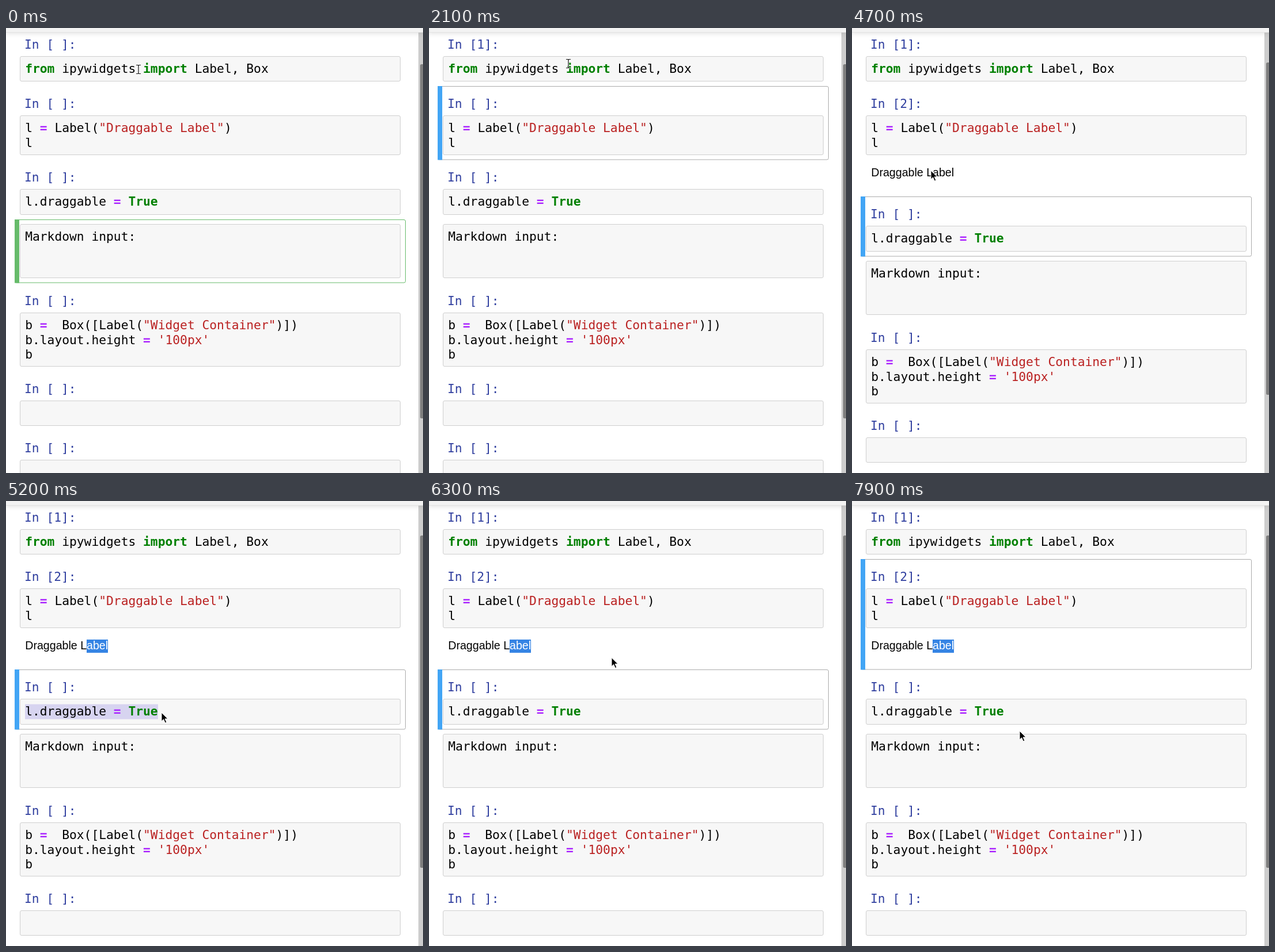
An HTML page that plays this animation: 724x774 px, repeating every 8000 ms.

```html
<!DOCTYPE html>
<html lang="en">
<head>
<meta charset="utf-8">
<title>Draggable label notebook</title>
<style>
html, body { margin: 0; width: 100%; height: 100%; overflow: hidden; background: #fff; }
#stage { position: relative; width: 724px; height: 774px; overflow: hidden; }
svg { position: absolute; left: 0; top: 0; }
#header {
  position: absolute; left: 0; top: 0; width: 724px; height: 7px;
  background: #f3f3f3; border-bottom: 1px solid #e4e4e4;
  box-shadow: 0 0 9px 1px rgba(87, 87, 87, .2);
}
text { white-space: pre; }
.code, .prompt { font: 21.27px "DejaVu Sans Mono", monospace; }
.prompt { fill: #303f9f; }
.label { font: 19.6px "Liberation Sans", Arial, sans-serif; }
.kw { fill: #008000; font-weight: bold; }
.op { fill: #a2f; font-weight: bold; }
.str { fill: #ba2121; }
.box { fill: #f7f7f7; stroke: #cfcfcf; }
</style>
</head>
<body>
<div id="stage">
  <svg id="page" width="724" height="774"></svg>
  <div id="header"></div>
  <svg id="pointer" width="724" height="774">
    <g id="arrow">
      <path d="M0 0V15.2L3.6 11.8L6.3 18L8.8 16.9L6.1 10.9H11Z" fill="#000" stroke="#fff" stroke-width="1"/>
    </g>
    <g id="beam" fill="none">
      <path id="stem" d="M-4 -7.5H-1L0 -6.5L1 -7.5H4M0 -6.5V6.5M-4 7.5H-1L0 6.5L1 7.5H4" stroke="#fff" stroke-width="2.4"/>
      <path d="M-4 -7.5H-1L0 -6.5L1 -7.5H4M0 -6.5V6.5M-4 7.5H-1L0 6.5L1 7.5H4" stroke="#111" stroke-width="1.2"/>
    </g>
  </svg>
</div>
<script>
const LOOP = 8000, STEP = 100, LINE = 25.4, CODE_X = 33.2, SHIFT = 64;
const page = document.getElementById('page');
const arrow = document.getElementById('arrow');
const beam = document.getElementById('beam');

function add(parent, tag, attrs, html) {
  const el = document.createElementNS('http://www.w3.org/2000/svg', tag);
  for (const k in attrs) el.setAttribute(k, attrs[k]);
  if (html) el.innerHTML = html;
  parent.appendChild(el);
  return el;
}
const show = (el, on) => el.setAttribute('visibility', on ? 'visible' : 'hidden');
const span = (cls, s) => `<tspan class="${cls}">${s}</tspan>`;
const kw = s => span('kw', s), op = s => span('op', s), str = s => span('str', s);

// Each cell: top of its box, box height, lines of code, prompt or not
const cells = [
  { y: 49.5, h: 43, code: [kw('from') + ' ipywidgets ' + kw('import') + ' Label, Box'] },
  { y: 152.5, h: 68, code: ['l ' + op('=') + ' Label(' + str('"Draggable Label"') + ')', 'l'] },
  { y: 280.5, h: 44, code: ['l.draggable ' + op('=') + ' ' + kw('True')] },
  { y: 341.5, h: 93, code: ['Markdown input:'], markdown: true },
  { y: 495.5, h: 93, code: ['b ' + op('=') + '  Box([Label(' + str('"Widget Container"') + ')])',
    'b.layout.height ' + op('=') + ' ' + str("'100px'"), 'b'] },
  { y: 648.5, h: 43, code: [] },
  { y: 751.5, h: 43, code: [] }
];

const upper = add(page, 'g'), lower = add(page, 'g');
let codeMark;
cells.forEach((c, i) => {
  const g = add(i < 2 ? upper : lower, 'g');
  add(g, 'rect', { class: 'box', x: 24.5, y: c.y, width: 660, height: c.h, rx: 2.5 });
  if (i === 2) {
    codeMark = add(g, 'rect', { x: 33, y: c.y + 9, width: 231, height: 26, fill: '#d7d4f0' });
  }
  c.code.forEach((line, n) =>
    add(g, 'text', { class: 'code', x: CODE_X, y: c.y + 28.8 + n * LINE }, line));
  if (!c.markdown) {
    c.prompt = add(g, 'text', { class: 'prompt', x: 32, y: c.y - 13.7 }, 'In [ ]:');
  }
});

// Widget output below the second cell
const output = add(page, 'g');
const mark = add(output, 'rect', { x: 140, y: 241, width: 37, height: 23, fill: '#3584e4' });
const label = add(output, 'text', { class: 'label', x: 33.3, y: 258 }, 'Draggable L<tspan>abel</tspan>');
const labelEnd = label.querySelector('tspan');

// Selected cell outline, text caret, scrollbar
const frame = add(page, 'rect', { x: 15.5, width: 678, rx: 2.5, fill: 'none' });
const bar = add(page, 'rect', { x: 15, width: 8 });
const caret = add(page, 'rect', { width: 1.6, height: 25.6, fill: '#000' });
add(page, 'rect', { x: 716, y: 8, width: 8, height: 766, fill: '#cdcdcd' });
const thumb = add(page, 'rect', { x: 719, width: 7, rx: 2.5, fill: '#7f7f7f' });

// Pointer path: time, x, y
const path = [
  [0, 230, 72], [300, 242, 62], [3900, 242, 62], [4000, 232, 86], [4200, 176, 190],
  [4300, 148, 240], [4400, 137, 259], [4600, 137, 259], [4700, 137, 248], [4800, 140, 251],
  [5000, 215, 316], [5200, 270, 368], [5500, 226, 315.5], [5600, 229, 319], [5700, 236, 320],
  [6300, 317, 272.5], [6700, 317, 272.5], [6800, 300, 272], [7300, 135, 244],
  [7500, 135, 244], [7900, 291, 400]
];

function pointerAt(t) {
  const i = path.findIndex(p => p[0] >= t);
  if (i <= 0) return path[0].slice(1);
  const [t0, x0, y0] = path[i - 1], [t1, x1, y1] = path[i];
  const k = (t - t0) / (t1 - t0);
  return [x0 + (x1 - x0) * k, y0 + (y1 - y0) * k];
}

// Selected cell over time: start, cell index, edit mode
const focus = [[0, 3, true], [900, 0, true], [2000, 1, false], [3300, 2, false], [7400, 1, false]];

function select(t, ran) {
  const [, index, edit] = focus.filter(f => f[0] <= t).pop();
  const c = cells[index], dy = ran && index > 1 ? SHIFT : 0;
  const top = c.y + dy - (c.markdown ? 8 : 51);
  const bottom = c.y + dy + c.h + 8.5 + (ran && index === 1 ? SHIFT : 0);
  frame.setAttribute('y', top);
  frame.setAttribute('height', bottom - top);
  frame.setAttribute('stroke', edit ? '#66bb6a' : '#ababab');
  bar.setAttribute('y', top - .5);
  bar.setAttribute('height', bottom - top + 1);
  bar.setAttribute('fill', edit ? '#66bb6a' : '#42a5f5');
}

function draw(t) {
  const ran = t >= 3300;
  lower.setAttribute('transform', `translate(0 ${ran ? SHIFT : 0})`);
  show(output, ran);
  select(t, ran);
  cells[0].prompt.textContent = `In [${t < 2000 ? ' ' : t < 2100 ? '*' : '1'}]:`;
  cells[1].prompt.textContent = `In [${ran ? '2' : ' '}]:`;
  thumb.setAttribute('y', ran ? 60 : 63);
  thumb.setAttribute('height', ran ? 578 : 616);

  const inFirst = t >= 900;
  caret.setAttribute('x', inFirst ? 238 : 33.2);
  caret.setAttribute('y', inFirst ? 58.2 : 400.8);
  show(caret, (t >= 100 && t < 600) || (t >= 900 && t < 1500));

  const [x, y] = pointerAt(t);
  const text = t < 4100 || t === 4200;
  const tool = text ? beam : arrow;
  tool.setAttribute('transform', `translate(${x} ${y})`);
  show(beam, text);
  show(arrow, !text);

  const marked = t >= 4800;
  mark.setAttribute('opacity', marked ? 1 : 0);
  labelEnd.setAttribute('fill', marked ? '#fff' : '#000');
  show(codeMark, t > 4700 && t < 5500 && y >= 345);
}

const start = performance.now();
function tick() {
  const t = (performance.now() - start) % LOOP;
  draw(Math.floor(t / STEP) * STEP);
  requestAnimationFrame(tick);
}
tick();
</script>
</body>
</html>
```
